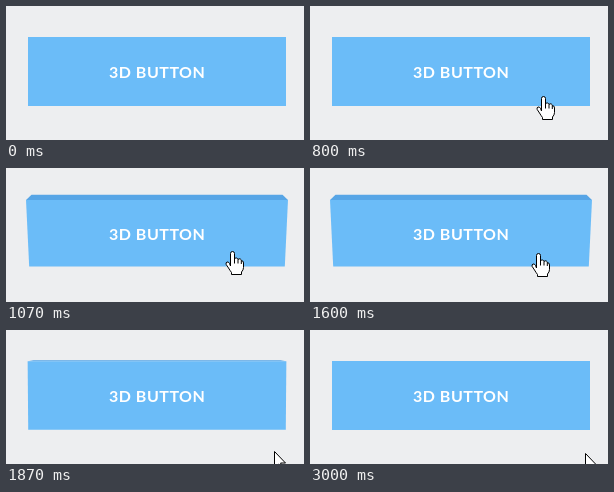
Recreate the animation shown at these times as an HTML page. Size 298 by 134 pixels, loop 3.67 s.

```html
<!DOCTYPE html>
<html lang="en">
<head>
<meta charset="utf-8">
<title>3D button</title>
<style>
  html, body { margin: 0; width: 100%; height: 100%; overflow: hidden; background: #edeef0; }
  svg { display: block; width: 298px; height: 134px; }
  text { font: 700 16px Lato, sans-serif; letter-spacing: .5px; fill: #fff; }
  .cursor { fill: #fff; stroke: #000; stroke-linejoin: round; }
</style>
</head>
<body>
<svg viewBox="0 0 298 134">
  <polygon id="lid" fill="#57a5e6"/>
  <polygon id="front" fill="#6bbcf8"/>
  <text x="151.2" y="72" text-anchor="middle">3D BUTTON</text>
  <path id="arrow" class="cursor" d="M.5 .5V16.5L4.2 13L6.8 18.5L9 17.5L6.6 12H11.5Z"/>
  <g id="hand" class="cursor">
    <path d="M-1.5 14V1.5Q-1.5 -.5 .5 -.5T2.5 1.5V7Q3 5.5 4.5 6T6 7.5Q7 6.3 8.3 7T9.3 8.8Q11.5 8.3 11.5 11V15.5Q11.5 18 9.5 20V22.5H-.5V20.5Q-2 18.5 -3.5 16L-5.8 12.5Q-6.5 10.5 -5 10T-2.5 11.5Z"/>
    <path d="M2.5 7V11.5M6 7.5V11.5M9.3 8.8V12" fill="none"/>
  </g>
</svg>
<script>
const LOOP = 3670, STEP = 1000 / 15, TURN = 300;
const ENTER = 793, LEAVE = 1712;
const $ = id => document.getElementById(id);
const mix = (a, b, p) => a + (b - a) * p;

// pointer path: time, x, y
const path = [
  [400, 277, 128], [467, 274, 126], [533, 268, 122], [600, 260, 117],
  [667, 252, 111], [733, 244, 103], [800, 233, 91], [867, 226, 84],
  [1533, 226, 84], [1600, 228, 86], [1667, 236, 95], [1733, 247, 106],
  [1800, 258, 115], [1867, 268, 121], [1933, 273, 123],
  [2933, 273, 123], [3000, 275, 123], [LOOP, 275, 123]
];

// CSS "ease": cubic-bezier(.25, .1, .25, 1)
function ease(x) {
  if (x <= 0 || x >= 1) return x <= 0 ? 0 : 1;
  const curve = (a, b, s) => 3 * a * s * (1 - s) ** 2 + 3 * b * s * s * (1 - s) + s ** 3;
  let lo = 0, hi = 1;
  for (let i = 0; i < 20; i++) {
    const mid = (lo + hi) / 2;
    if (curve(.25, .25, mid) < x) lo = mid; else hi = mid;
  }
  return curve(.1, 1, lo);
}

function pointer(t) {
  const i = path.findIndex(k => k[0] > t);
  if (i < 1) return null;
  const [a, b] = [path[i - 1], path[i]];
  const p = (t - a[0]) / (b[0] - a[0]);
  return [mix(a[1], b[1], p), mix(a[2], b[2], p)];
}

function trapezoid(id, topHalf, top, baseHalf, base) {
  const c = 151;
  $(id).setAttribute('points',
    [c - topHalf, top, c + topHalf, top, c + baseHalf, base, c - baseHalf, base].join(' '));
}

function draw(t) {
  const tilt = ease((t - ENTER) / TURN) - ease((t - LEAVE) / TURN);
  const edge = mix(129, 131, tilt), top = mix(31, 32, tilt);
  trapezoid('lid', mix(123, 125.5, tilt), mix(31, 26.7, tilt), edge, top);
  trapezoid('front', edge, top, mix(129, 127.8, tilt), mix(100, 98.5, tilt));

  const at = pointer(t);
  const hover = at && at[1] < 100;
  for (const [id, on] of [['arrow', at && !hover], ['hand', hover]]) {
    $(id).style.display = on ? '' : 'none';
    if (on) $(id).setAttribute('transform', `translate(${at.map(Math.round)})`);
  }
}

function tick() {
  const t = performance.now() % LOOP;
  // the picture advances at 15 frames a second
  draw(Math.floor((t + 5) / STEP) * STEP + .5);
  requestAnimationFrame(tick);
}
tick();
</script>
</body>
</html>
```
